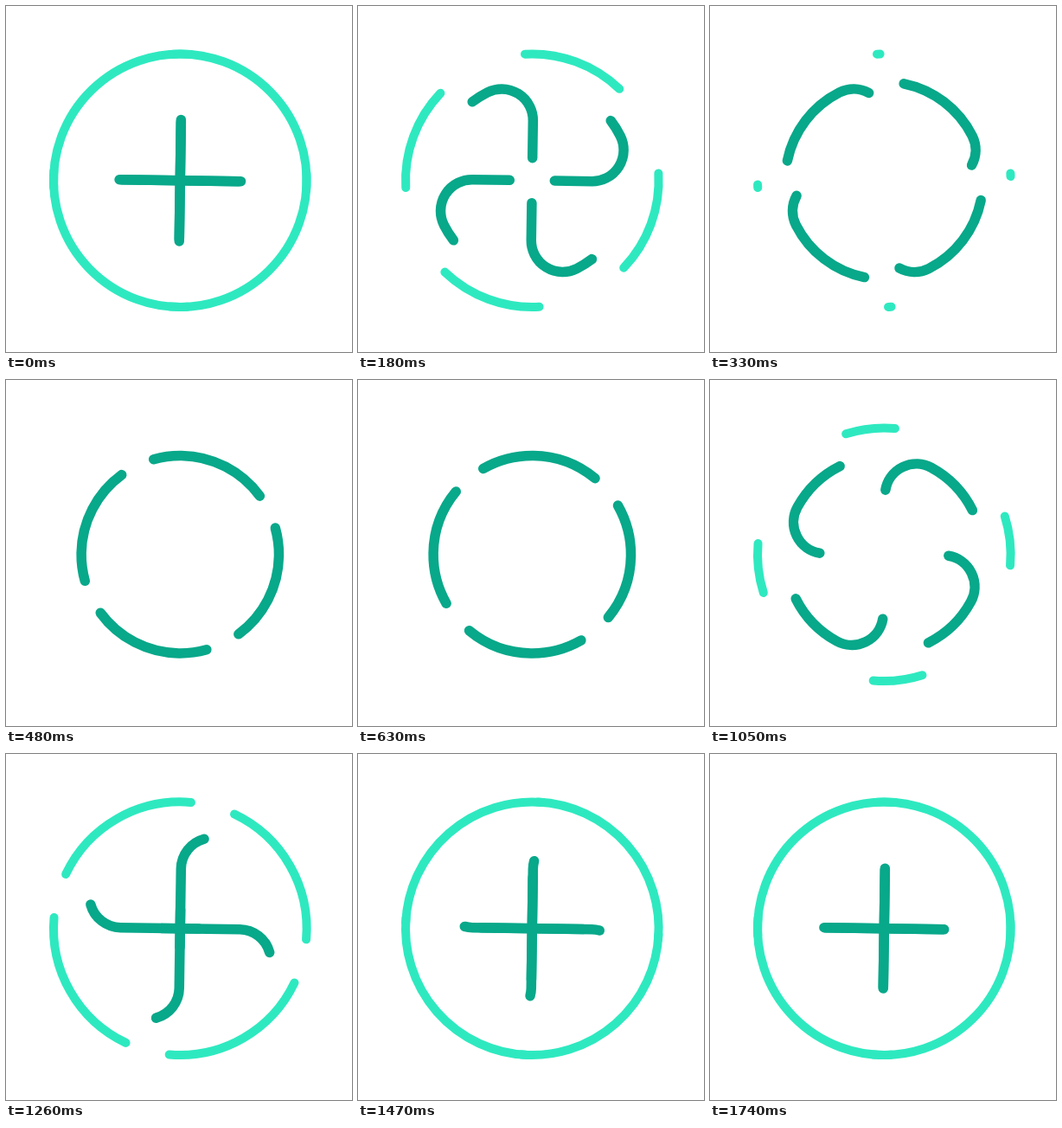
Recreate the animation shown at these times as an HTML page. Size 400 by 400 pixels, loop 3860 ms.

```html
<!DOCTYPE html>
<html lang="en">
<head>
<meta charset="utf-8">
<title>Plus loader</title>
<style>
  html, body { margin: 0; width: 100%; height: 100%; overflow: hidden; background: #fff; }
  svg { display: block; width: 100%; height: 100%; }
  path { fill: none; stroke-linecap: round; }
  .ring { stroke: #2ee9c0; stroke-width: 10; }
  .arm { stroke: #08a88a; stroke-width: 11.5; }
</style>
</head>
<body>
<svg viewBox="0 0 400 400"><g id="stage" transform="translate(201.3 201.7) rotate(0.85)"></g></svg>
<script>
const LOOP = 3860, STEP = 30, LAST = 1740;
const HALF = 69, ARM_R = 114.2, RING_R = 146.3, OVERLAP = 4.1;

// Distance travelled along each path at a few moments.
const times = [0, 90, 180, 330, 480, 645, 810, 1050, 1260, 1440, 1620, 1740];
const armTravel = [1.3, 34, 95, 177, 231, 262, 295, 391, 488, 523, 533, 534.2];
const ringTravel = [1, 47, 131, 247, 326, 370, 417, 559, 679, 733, 750, 752];

// Monotone cubic interpolation, at rest at both ends.
function curve(xs, ys) {
  const slope = xs.slice(1).map((x, i) => (ys[i + 1] - ys[i]) / (x - xs[i]));
  const tangent = xs.map((_, i) => {
    if (i === 0) return slope[0] * 0.4;
    if (i === xs.length - 1) return 0;
    return 2 * slope[i - 1] * slope[i] / (slope[i - 1] + slope[i]);
  });
  return x => {
    let i = 0;
    while (i < xs.length - 2 && x > xs[i + 1]) i++;
    const w = xs[i + 1] - xs[i], u = (x - xs[i]) / w, v = 1 - u;
    return v * v * (1 + 2 * u) * ys[i] + u * v * v * w * tangent[i]
      + u * u * (3 - 2 * u) * ys[i + 1] - u * u * v * w * tangent[i + 1];
  };
}

// Closed loop: straight bar, bend, arc of the big circle, bend back into the bar.
function armPath() {
  const bend = (ARM_R ** 2 - HALF ** 2) / (2 * ARM_R);
  const k = ARM_R / (ARM_R - bend), x = -bend * k, y = HALF * k;
  const arc = (r, px, py) => `A${r} ${r} 0 0 0 ${px} ${py}`;
  return `M0 ${HALF}L0 ${-HALF}` + arc(bend, x, -y) + arc(ARM_R, x, y) + arc(bend, 0, HALF);
}

function ringPath() {
  const at = deg => {
    const a = deg * Math.PI / 180;
    return `${RING_R * Math.sin(a)} ${-RING_R * Math.cos(a)}`;
  };
  return `M${at(OVERLAP)}A${RING_R} ${RING_R} 0 0 0 ${at(-90 - OVERLAP)}`;
}

const stage = document.getElementById('stage');
function addFour(name, d) {
  return [0, 90, 180, 270].map(turn => {
    const path = document.createElementNS('http://www.w3.org/2000/svg', 'path');
    path.setAttribute('class', name);
    path.setAttribute('d', d);
    path.setAttribute('transform', `rotate(${turn})`);
    stage.append(path);
    return path;
  });
}

const rings = addFour('ring', ringPath());
const arms = addFour('arm', armPath());
const ringLength = rings[0].getTotalLength();
const armLength = arms[0].getTotalLength();
const armAt = curve(times, armTravel), ringAt = curve(times, ringTravel);

function setDash(paths, dash, gap, travel) {
  for (const path of paths) {
    path.style.strokeDasharray = `${dash} ${gap}`;
    path.style.strokeDashoffset = -travel;
  }
}

function draw(ms) {
  const t = Math.min(Math.floor(ms / STEP) * STEP, LAST);
  setDash(arms, 2 * HALF, armLength - 2 * HALF, armAt(t));
  setDash(rings, ringLength, 2 * ringLength, ringAt(t));
}

const start = performance.now();
function tick() {
  draw((performance.now() - start) % LOOP);
  requestAnimationFrame(tick);
}
tick();
</script>
</body>
</html>
```
